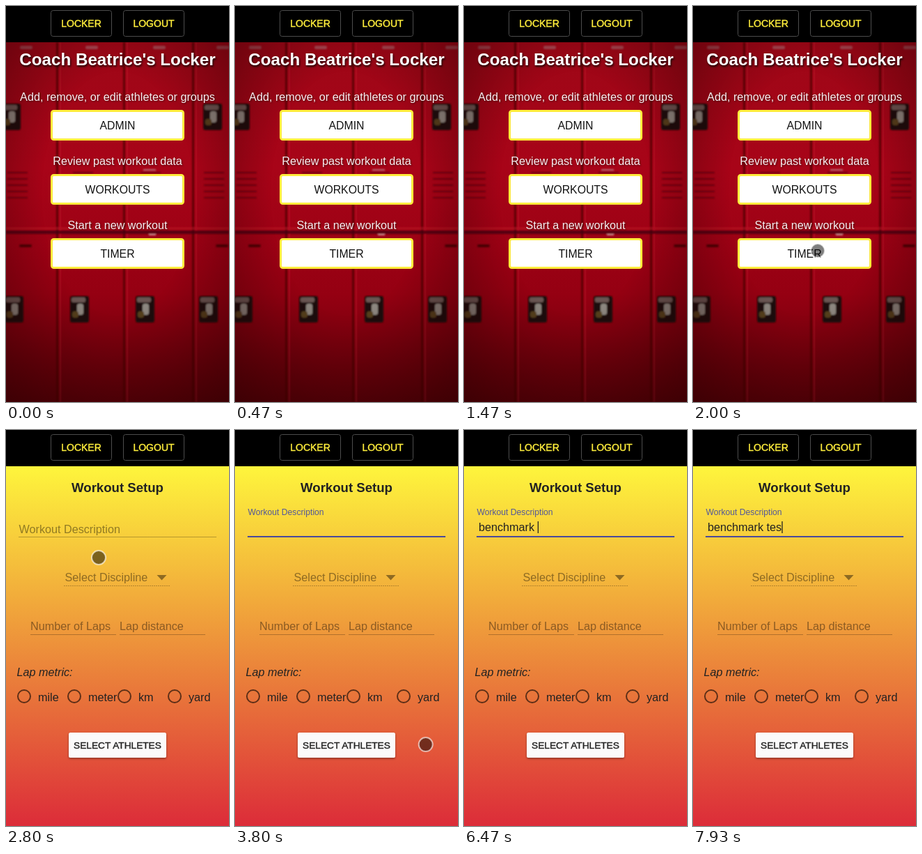
An HTML page that plays this animation: 320x568 px, repeating every 8000 ms.

```html
<!DOCTYPE html>
<html lang="en">
<head>
<meta charset="utf-8">
<title>Workout timer</title>
<style>
  html, body { margin: 0; width: 100%; height: 100%; overflow: hidden; background: #000; }
  svg { display: block; width: 100%; height: 100%; }
  text { font: 16.2px "Liberation Sans", Arial, sans-serif; white-space: pre; }
  .mid { text-anchor: middle; }
  .title { font-size: 24.2px; font-weight: bold; fill: #fff; filter: drop-shadow(1.5px 2px 1.5px rgba(0,0,0,.85)); }
  .sub { fill: #f6f0f0; filter: drop-shadow(1px 1px 1px rgba(0,0,0,.5)); }
  .btn { font-size: 15.8px; fill: #111; }
  .nav { font-size: 14px; fill: #ffee3c; stroke: #ffee3c; stroke-width: .45px; }
  .head { font-size: 18.6px; font-weight: bold; fill: #222; }
  .hint { fill: #000; fill-opacity: .42; }
  .dark { fill: #222; }
  .action { font-size: 13.7px; fill: #222; stroke: #222; stroke-width: .4px; }
  .rule { stroke: #000; stroke-opacity: .26; }
</style>
</head>
<body>
<svg id="stage" viewBox="0 0 320 568" preserveAspectRatio="none">
  <defs>
    <linearGradient id="red" x2="0" y2="1">
      <stop offset="0" stop-color="#9e0717"/>
      <stop offset=".35" stop-color="#a80418"/>
      <stop offset=".7" stop-color="#950012"/>
      <stop offset="1" stop-color="#5c0009"/>
    </linearGradient>
    <linearGradient id="sunset" x2="0" y2="1">
      <stop offset="0" stop-color="#fef53c"/>
      <stop offset="1" stop-color="#dc2c39"/>
    </linearGradient>
    <radialGradient id="shade" cx=".5" cy=".42" r=".75">
      <stop offset=".45" stop-color="#200" stop-opacity="0"/>
      <stop offset="1" stop-color="#200" stop-opacity=".5"/>
    </radialGradient>
    <filter id="soft"><feGaussianBlur stdDeviation="1.3"/></filter>
    <filter id="drop" x="-10%" y="-30%" width="120%" height="180%">
      <feDropShadow dx="0" dy="1.5" stdDeviation="1.5" flood-opacity=".4"/>
    </filter>
  </defs>

  <g id="locker">
    <rect y="52" width="320" height="516" fill="url(#red)"/>
    <g id="doors" filter="url(#soft)"></g>
    <rect y="52" width="320" height="516" fill="url(#shade)"/>
    <text class="title mid" x="160" y="85">Coach Beatrice's Locker</text>
    <g id="menu"></g>
  </g>

  <g id="setup">
    <rect y="52" width="320" height="516" fill="url(#sunset)"/>
    <text class="head mid" x="160" y="89">Workout Setup</text>
    <path class="rule" d="M18 153.5H302M35 293.5H158M163 293.5H286"/>
    <path class="rule" d="M83 223.5H236" stroke-dasharray="2 1"/>
    <path id="focus" stroke="#4a4a9a" stroke-width="2" d="M-142 0H142"/>
    <text id="label">Workout Description</text>
    <text id="typed" class="dark" x="21" y="145"></text>
    <path id="caret" stroke="#222" stroke-width="1.3" d="M0 131V148"/>
    <text class="hint" x="84.5" y="217">Select Discipline</text>
    <path class="hint" d="M216.5 208H230.5L223.5 215.5Z"/>
    <text class="hint" x="35" y="287">Number of Laps</text>
    <text class="hint" x="163" y="287">Lap distance</text>
    <text class="dark" x="15.5" y="353" font-style="italic" style="font-style:italic">Lap metric:</text>
    <g id="radios"></g>
    <rect x="90" y="434" width="140" height="36" rx="2.5" fill="#fbfafa" filter="url(#drop)"/>
    <text class="action mid" x="160" y="457">SELECT ATHLETES</text>
  </g>

  <rect width="320" height="52"/>
  <g id="nav"></g>
  <circle id="touch" r="10" fill="#000" fill-opacity=".5" stroke="#fff" stroke-opacity=".6" stroke-width="2"/>
</svg>
<script>
const LOOP = 8000, PAGE_AT = 2350, FOCUS_AT = 3050;
const $ = id => document.getElementById(id);
const clamp = v => Math.max(0, Math.min(1, v));
const smooth = p => p * p * (3 - 2 * p);
const easeOut = p => 1 - (1 - p) ** 5;
const mix = (a, b, p) => a + (b - a) * p;
const rect = (x, y, w, h, fill, extra = "") =>
  `<rect x="${x}" y="${y}" width="${w}" height="${h}" fill="${fill}" ${extra}/>`;
const label = (cls, x, y, s) => `<text class="${cls}" x="${x}" y="${y}">${s}</text>`;

function vents(x, y, w, n, gap, fill) {
  let out = "";
  for (let i = 0; i < n; i++) out += rect(x, y + i * gap, w, 2, fill);
  return out;
}

function latch(x, y) {
  return rect(x - 13, y - 19, 27, 38, "#1d0c0a", 'rx="3"') +
    rect(x - 11, y - 17, 20, 7, "#6b5752", 'rx="2"') +
    rect(x - 3, y - 8, 9, 16, "#8d8780", 'rx="3"') +
    rect(x - 10, y + 3, 9, 9, "#54401e", 'rx="3"');
}

function drawDoors() {
  let out = "";
  for (const x of [-22, 72, 168, 267]) {
    out += rect(x, 52, 3, 516, "#4c0009", 'opacity=".75"') +
      rect(x + 5, 52, 2, 516, "#c3162a", 'opacity=".45"');
  }
  out += rect(0, 317, 320, 4, "#c21b2c", 'opacity=".4"') +
    rect(0, 322, 320, 5, "#42000a", 'opacity=".75"');
  [29, 123, 220, 311].forEach((x, i) => {
    out += rect(x - 9, 57, 18, 5, "#a8606a", 'rx="2" opacity=".7"') +
      rect(x - 10, 342, 18, 4, "#3c0008", 'rx="2" opacity=".8"') +
      vents(x - 27, 238, 29, 5, 9, "#70000c");
  });
  out += rect(197, 234, 18, 2, "#b87078") + rect(205, 327, 10, 2, "#d08a90");
  out += latch(7, 159) + latch(296, 159);
  for (const x of [11, 105, 199, 290]) out += latch(x, 435);
  $("doors").innerHTML = out;
}

function drawMenu() {
  const items = [
    ["Add, remove, or edit athletes or groups", "ADMIN"],
    ["Review past workout data", "WORKOUTS"],
    ["Start a new workout", "TIMER"]
  ];
  $("menu").innerHTML = items.map(([note, name], i) => {
    const y = i * 92;
    return label("sub mid", 160, 136 + y, note) +
      rect(65.5, 150.5 + y, 189, 41, "#fff", 'rx="3" stroke="#fdec3c" stroke-width="3"') +
      label("btn mid", 160, 177 + y, name);
  }).join("");
}

function drawControls() {
  $("nav").innerHTML = ["LOCKER", "LOGOUT"].map((s, i) =>
    rect(64.5 + i * 104, 6.5, 87, 37, "#000", 'rx="3" stroke="#4c4c4c"') +
    label("nav mid", 108 + i * 104, 30, s)).join("");
  $("radios").innerHTML = ["mile", "meter", "km", "yard"].map((s, i) =>
    `<circle cx="${26 + i * 72}" cy="382" r="9" fill="none" stroke="#000" stroke-opacity=".6" stroke-width="2"/>` +
    label("dark", 46 + i * 72, 389, s)).join("");
}

const phrase = "benchmark tes";
const keys = [3980, 4260, 4500, 4760, 5060, 5320, 5580, 5840, 6100, 6350, 6980, 7340, 7680];

// time, x, y
const route = [
  [1500, 335, 590], [1900, 179, 351], [2450, 179, 351], [2800, 133, 183],
  [3000, 128, 146], [3550, 128, 146], [3950, 340, 590]
];

function touchAt(t) {
  const i = route.findIndex(p => p[0] > t);
  if (i < 1) return [-50, -50];
  const [a, b] = [route[i - 1], route[i]];
  const p = smooth((t - a[0]) / (b[0] - a[0]));
  return [mix(a[1], b[1], p), mix(a[2], b[2], p)];
}

function show(id, on) { $(id).style.display = on ? "" : "none"; }

function render(t) {
  show("locker", t < PAGE_AT);
  show("setup", t >= PAGE_AT);
  $("touch").setAttribute("transform", `translate(${touchAt(t)})`);
  if (t < PAGE_AT) return;

  const p = easeOut(clamp((t - FOCUS_AT) / 450));
  const focused = t >= FOCUS_AT;
  const tag = $("label");
  tag.setAttribute("transform", `translate(18.5 ${mix(147.5, 121.7, p)}) scale(${mix(1, .75, p)})`);
  tag.setAttribute("fill", `rgba(${mix(0, 63, p)},${mix(0, 72, p)},${mix(0, 165, p)},${mix(.42, .9, p)})`);
  show("focus", focused);
  $("focus").setAttribute("transform", `translate(160 153) scale(${p} 1)`);

  const count = keys.filter(k => k <= t).length;
  const typed = $("typed");
  typed.textContent = phrase.slice(0, count);
  const since = t - (count ? keys[count - 1] : FOCUS_AT);
  show("caret", focused && since % 1000 < 550);
  const end = count ? typed.getComputedTextLength() : 0;
  $("caret").setAttribute("transform", `translate(${21.8 + end} 0)`);
}

drawDoors();
drawMenu();
drawControls();
const start = performance.now();
function tick() {
  render((performance.now() - start) % LOOP);
  requestAnimationFrame(tick);
}
tick();
</script>
</body>
</html>
```
